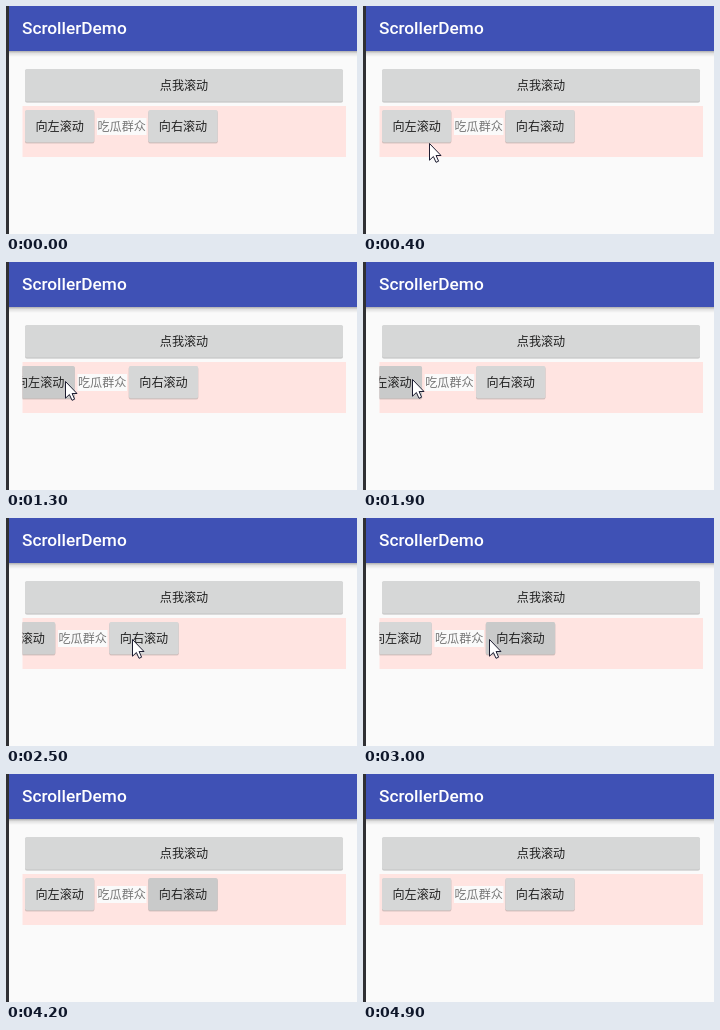
Write an HTML page that moves like this. It is 351 by 228 pixels and loops after 5500 ms.

```html
<!DOCTYPE html>
<html lang="zh">
<head>
<meta charset="utf-8">
<title>ScrollerDemo</title>
<style>
html, body { margin: 0; width: 100%; height: 100%; overflow: hidden; background: #fafafa; }
svg { display: block; width: 351px; height: 228px; }
text { font: 12.1px "Noto Sans CJK SC", "Noto Sans CJK", sans-serif; fill: #212121; text-anchor: middle; }
.title { font: 500 17.3px Roboto, sans-serif; fill: #fff; text-anchor: start; }
.label { fill: #777; }
</style>
</head>
<body>
<svg viewBox="0 0 351 228">
  <defs>
    <linearGradient id="shade" x2="0" y2="1">
      <stop stop-color="#000" stop-opacity=".3"/>
      <stop offset=".4" stop-color="#000" stop-opacity=".1"/>
      <stop offset="1" stop-color="#000" stop-opacity="0"/>
    </linearGradient>
    <clipPath id="panel"><rect x="16.5" y="100" width="323.5" height="51"/></clipPath>
  </defs>
  <rect width="351" height="228" fill="#fafafa"/>
  <rect y="45" width="351" height="6" fill="url(#shade)"/>
  <rect width="351" height="45" fill="#3f51b5"/>
  <rect width="3" height="228" fill="#303034"/>
  <text class="title" x="16" y="28">ScrollerDemo</text>
  <g id="top"></g>
  <rect x="16.5" y="100" width="323.5" height="51" fill="#ffe4e1"/>
  <g clip-path="url(#panel)">
    <g id="row">
      <g id="left"></g>
      <rect x="91" y="112" width="49.5" height="17" fill="#fafafa"/>
      <text class="label" x="115.7" y="124.8">吃瓜群众</text>
      <g id="right"></g>
    </g>
  </g>
  <path id="cursor" d="M.5 .5V17.2L4.4 13.5 7 19.3 9.6 18.2 7.1 12.5H12Z" fill="#fff" stroke="#1c1c30" stroke-linejoin="round"/>
</svg>
<script>
const LOOP = 5500, STEP = 9.75;
const $ = id => document.getElementById(id);

function button(id, x, y, w, h, label) {
  const box = (dy, fill, extra = "") =>
    `<rect x="${x}" y="${y + dy}" width="${w}" height="${h}" rx="1.8" fill="${fill}" ${extra}/>`;
  $(id).innerHTML = box(1.3, "#000", 'opacity=".1"') + box(.6, "#000", 'opacity=".13"') +
    box(0, "#d6d7d7") + box(0, "#000", 'class="ink" opacity="0"') +
    `<text x="${x + w / 2}" y="${y + h / 2 + 4.5}">${label}</text>`;
  return $(id).querySelector(".ink");
}
button("top", 19, 63, 318, 32.6, "点我滚动");
const leftInk = button("left", 19, 104, 69.3, 32.4, "向左滚动");
const rightInk = button("right", 142.3, 104, 69.4, 32.4, "向右滚动");

const leftClicks = [900, 1300, 1800, 2200];
const rightClicks = [2700, 3000, 3600, 4000];

// pointer stops: time, x, y; null hides it
const stops = [
  [0, null], [100, 121, 159], [200, 103, 152], [300, 80, 143], [400, 66, 137],
  [500, 64, 134], [600, 63, 132], [700, 59, 119], [1500, 54, 118], [1600, 49, 117],
  [2300, 82, 126], [2400, 112, 124], [2500, 126, 121], [3100, 148, 119],
  [3200, 162, 118], [4100, 321, 133], [4200, null], [4800, 317, 66], [4900, null]
];

const count = (list, t) => list.filter(c => c <= t).length;

function ink(clicks, t) {
  const last = clicks.filter(c => c <= t).pop();
  if (last === undefined) return 0;
  const age = t - last;
  return age < 200 ? .06 : Math.max(0, .06 * (1 - (age - 200) / 200));
}

function draw(time) {
  const t = Math.floor(time % LOOP / 100) * 100;
  const shift = STEP * (count(rightClicks, t) - count(leftClicks, t));
  $("row").setAttribute("transform", `translate(${shift} 0)`);
  leftInk.setAttribute("opacity", ink(leftClicks, t));
  rightInk.setAttribute("opacity", ink(rightClicks, t));
  const [, x, y] = stops.filter(s => s[0] <= t).pop();
  $("cursor").setAttribute("visibility", x === null ? "hidden" : "visible");
  if (x !== null) $("cursor").setAttribute("transform", `translate(${x} ${y})`);
}

const start = performance.now();
function tick() {
  draw(performance.now() - start);
  requestAnimationFrame(tick);
}
draw(0);
requestAnimationFrame(tick);
</script>
</body>
</html>
```
